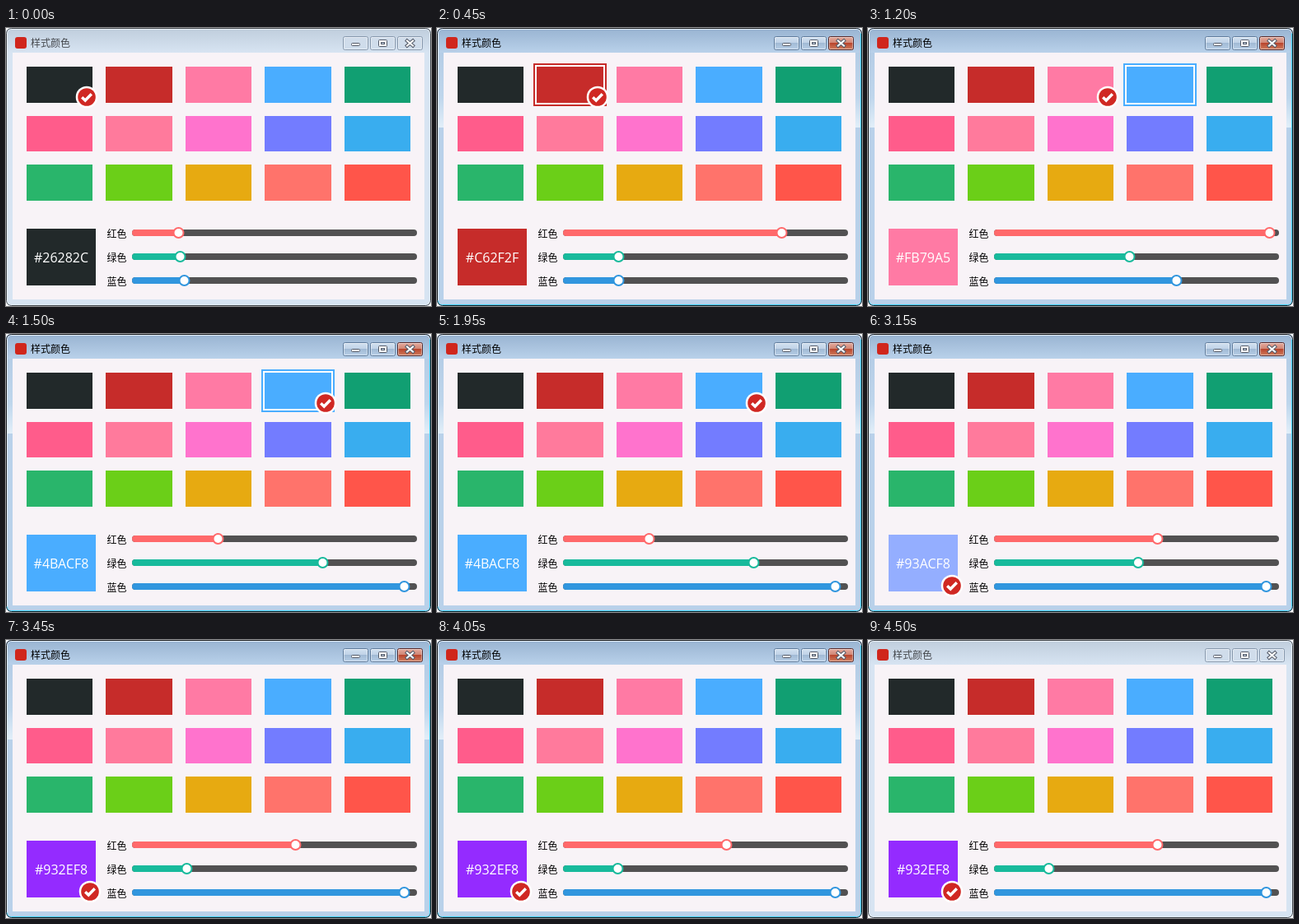
An HTML page that plays this animation: 516 px wide and 338 px high, repeating every 4.65 s.

```html
<!DOCTYPE html>
<html lang="zh-CN">
<head>
<meta charset="utf-8">
<title>样式颜色</title>
<style>
html, body { margin: 0; width: 100%; height: 100%; overflow: hidden; background: #fff; }
svg { display: block; width: 516px; height: 338px; }
text { font-family: "Noto Sans CJK SC", "Noto Sans CJK", sans-serif; font-size: 12px; }
#hex { font-family: "Open Sans", "Noto Sans", sans-serif; font-size: 16px; fill: #fff; text-anchor: middle; }
rect.sharp { shape-rendering: crispEdges; }
</style>
</head>
<body>
<svg id="stage" viewBox="0 0 516 338" xmlns="http://www.w3.org/2000/svg">
  <defs>
    <linearGradient id="capOn" x2="0" y2="1">
      <stop offset="0" stop-color="#98b3d1"/><stop offset="1" stop-color="#b9d1ea"/>
    </linearGradient>
    <linearGradient id="capOff" x2="0" y2="1">
      <stop offset="0" stop-color="#bfcddc"/><stop offset="1" stop-color="#d7e4f2"/>
    </linearGradient>
    <linearGradient id="sideOn" x2="0" y2="1">
      <stop offset="0" stop-color="#b5cde6"/><stop offset=".6" stop-color="#bfd6ec"/><stop offset="1" stop-color="#e2eff9"/>
    </linearGradient>
    <linearGradient id="btnOn" x2="0" y2="1">
      <stop offset="0" stop-color="#d3e1f0"/><stop offset=".48" stop-color="#bfd2e7"/>
      <stop offset=".5" stop-color="#a1bad5"/><stop offset="1" stop-color="#b9d0e8"/>
    </linearGradient>
    <linearGradient id="btnOff" x2="0" y2="1">
      <stop offset="0" stop-color="#d0dcea"/><stop offset="1" stop-color="#cfddec"/>
    </linearGradient>
    <linearGradient id="closeOn" x2="0" y2="1">
      <stop offset="0" stop-color="#e5aa9d"/><stop offset=".48" stop-color="#d08573"/>
      <stop offset=".5" stop-color="#b9452d"/><stop offset="1" stop-color="#d08060"/>
    </linearGradient>
    <clipPath id="frameClip"><rect width="516" height="338" rx="6"/></clipPath>
  </defs>
</svg>
<script>
const $ = id => document.getElementById(id);
const stage = $('stage');

function add(tag, attrs, parent = stage) {
  const el = document.createElementNS('http://www.w3.org/2000/svg', tag);
  set(el, attrs);
  parent.appendChild(el);
  return el;
}
function set(el, attrs) {
  for (const k in attrs) el.setAttribute(k, attrs[k]);
}
function box(x, y, width, height, fill, parent) {
  return add('rect', { x, y, width, height, fill, class: 'sharp' }, parent);
}
function label(x, y, str, fill = '#000') {
  const el = add('text', { x, y, fill });
  el.textContent = str;
  return el;
}

// Window frame, one layer for each focus state
function frame(active) {
  const g = add('g', { 'clip-path': 'url(#frameClip)' });
  box(0, 0, 516, 338, active ? '#b9d1ea' : '#d7e4f2', g);
  box(0, 0, 516, 30, `url(#cap${active ? 'On' : 'Off'})`, g);
  if (active) {
    box(1, 30, 7, 91, 'url(#sideOn)', g);
    box(508, 30, 7, 91, 'url(#sideOn)', g);
  }
  const line = (d, stroke) => add('path', { d, stroke, fill: 'none' }, g);
  line('M1.5 336.5V6.5q0-5 5-5H509.5q5 0 5 5', active ? '#e6f1fa' : '#edf3f9');
  line('M514.5 6.5V331.5q0 5-5 5H6.5q-5 0-5-5', active ? '#3fd3f7' : '#e6f0f8');
  add('rect', { x: .5, y: .5, width: 515, height: 337, rx: 6, fill: 'none', stroke: active ? '#1d2227' : '#464b51' }, g);

  [409, 442, 475].forEach((x, i) => {
    const hot = active && i === 2;
    const fill = hot ? 'closeOn' : active ? 'btnOn' : 'btnOff';
    add('rect', { x: x + .5, y: 10.5, width: 30, height: 16, rx: 2, fill: `url(#${fill})`,
      stroke: hot ? '#5a2b2b' : active ? '#607c9c' : '#8798ad' }, g);
    add('rect', { x: x + 1.5, y: 11.5, width: 28, height: 14, rx: 1, fill: 'none', stroke: '#fff', 'stroke-opacity': .45 }, g);
  });
  const glyph = { fill: '#fff', stroke: '#535a68' };
  add('rect', { x: 419.5, y: 18.5, width: 10, height: 3, rx: 1, ...glyph }, g);
  add('rect', { x: 452.5, y: 14.5, width: 10, height: 8, rx: 1, ...glyph }, g);
  add('rect', { x: 455.5, y: 17.5, width: 4, height: 2, fill: '#c3d3e5', stroke: '#535a68' }, g);
  const cross = 'M487 15.5L494 21.5M494 15.5L487 21.5';
  add('path', { d: cross, stroke: '#535a68', 'stroke-width': 4.2, 'stroke-linecap': 'square' }, g);
  add('path', { d: cross, stroke: '#fff', 'stroke-width': 2.2, 'stroke-linecap': 'square' }, g);
  return g;
}
const idle = frame(false), focused = frame(true);
add('rect', { x: 11, y: 11, width: 14, height: 14, rx: 3, fill: '#d0261c' });
const title = label(30, 22.5, '样式颜色');
box(8, 30, 500, 300, '#f8f3f7');

// Swatches
const colors = ['#22292a', '#c62c2a', '#ff7aa4', '#4aadff', '#119f72',
  '#ff5c8b', '#ff7a9c', '#ff73cd', '#737cff', '#39adef',
  '#29b56b', '#6bcf18', '#e7aa11', '#ff736b', '#ff554a'];
const cols = [[25, 80], [121, 81], [218, 80], [314, 81], [411, 80]];
const rows = [[47, 44], [107, 43], [166, 44]];
const cell = i => {
  const [x, w] = cols[i % 5], [y, h] = rows[Math.floor(i / 5)];
  return { x, y, w, h };
};
const ring = box(0, 0, 0, 0, '#fff');
set(ring, { 'stroke-width': 2 });
colors.forEach((c, i) => {
  const { x, y, w, h } = cell(i);
  box(x, y, w, h, c);
});

// Preview and sliders
const preview = box(25, 244, 84, 69, '#000');
const hex = label(67, 284.5, '', '#fff');
hex.id = 'hex';
const sliders = [['红色', '#ff696b'], ['绿色', '#18ba9c'], ['蓝色', '#3196de']].map(([name, color], i) => {
  const y = 249 + 29 * i;
  label(122.5, y + 5.5, name);
  add('rect', { x: 153, y: y - 4, width: 346, height: 8, rx: 4, fill: '#525152' });
  const bar = add('rect', { x: 153, y: y - 4, height: 8, rx: 4, fill: color });
  const knob = add('circle', { cy: y, r: 6, fill: '#fff', stroke: color, 'stroke-width': 2 });
  return { bar, knob };
});

// Tick badge
const badge = add('g', {});
add('circle', { r: 13.3, fill: '#fff' }, badge);
add('circle', { r: 10.8, fill: '#d02823' }, badge);
add('path', { d: 'M-5.8 .2L-1.8 4L5.8-3.8', fill: 'none', stroke: '#fff', 'stroke-width': 3.4 }, badge);

// Picked colours: hex, fill, badge swatch (-1 = preview), knob positions
const picks = {
  black: ['#26282C', colors[0], 0, [209.5, 211.5, 216.5]],
  red: ['#C62F2F', colors[1], 1, [418.5, 220.5, 220.5]],
  pink: ['#FB79A5', colors[2], 2, [487.5, 317.5, 374.5]],
  blue: ['#4BACF8', colors[3], 3, [257.5, 384.5, 483.5]],
  lilac: ['#93ACF8', '#94aeff', -1, [351.5, 384.5, 483.5]],
  violet: ['#932EF8', '#942bff', -1, [351.5, 219.5, 483.5]]
};

// Steps: start ms, pick, hovered swatch, dragged slider and its position
const steps = [
  [0, 'black'],
  [150, 'black', 1],
  [450, 'red', 1],
  [750, 'red', 2],
  [1050, 'pink', 2],
  [1200, 'pink', 3],
  [1500, 'blue', 3],
  [1650, 'blue', 8],
  [1800, 'blue', 12],
  [1950, 'blue'],
  [2400, 'blue', null, 0, 345],
  [2550, 'lilac'],
  [3150, 'lilac', null, 1, 328],
  [3300, 'lilac', null, 1, 223],
  [3450, 'violet'],
  [3900, 'violet', 2],
  [4050, 'violet']
];
const LOOP = 4650, FOCUS = [450, 4500];

function draw(t) {
  const [, name, hover, drag, pos] = steps.filter(s => s[0] <= t).pop();
  const [code, fill, spot, knobs] = picks[name];
  const active = t >= FOCUS[0] && t < FOCUS[1];
  set(idle, { display: active ? 'none' : 'inline' });
  set(focused, { display: active ? 'inline' : 'none' });
  set(title, { fill: active ? '#000' : '#45484d' });

  if (hover != null) {
    const { x, y, w, h } = cell(hover);
    set(ring, { x: x - 3, y: y - 3, width: w + 6, height: h + 6, stroke: colors[hover], display: 'inline' });
  } else set(ring, { display: 'none' });

  set(preview, { fill });
  if (hex.textContent !== code) hex.textContent = code;
  sliders.forEach(({ bar, knob }, i) => {
    const x = i === drag ? pos : knobs[i];
    set(bar, { width: x - 153 });
    set(knob, { cx: x });
  });
  const c = spot < 0 ? { x: 25, y: 244, w: 84, h: 69 } : cell(spot);
  set(badge, { transform: `translate(${c.x + c.w - 7} ${c.y + c.h - 7})` });
}

const start = performance.now();
function tick() {
  draw((performance.now() - start) % LOOP);
  requestAnimationFrame(tick);
}
tick();
</script>
</body>
</html>
```
